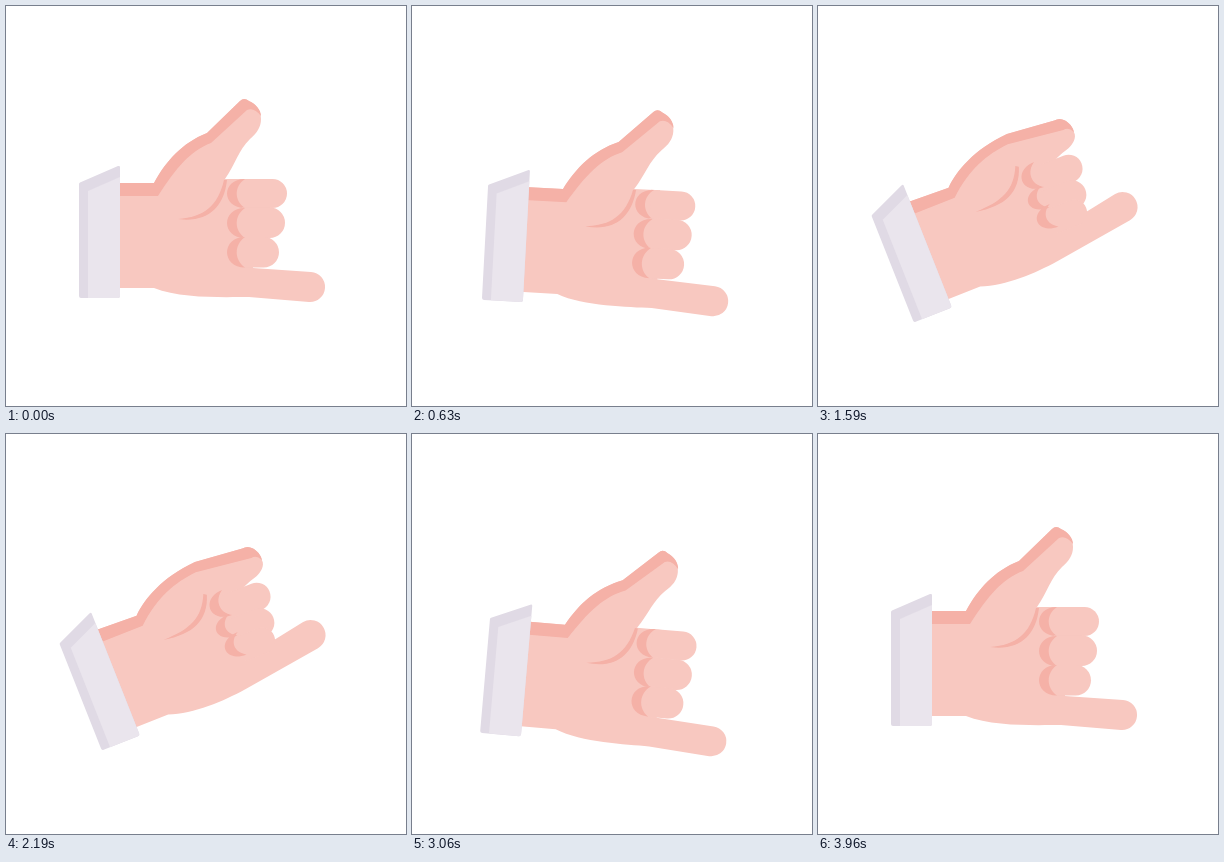
Animation of 400 by 400 pixels, one loop 3990 ms. Source, as an HTML page:

```html
<!DOCTYPE html>
<html lang="en">
<head>
<meta charset="utf-8">
<title>Shaka hand</title>
<style>
  html, body { margin: 0; width: 100%; height: 100%; overflow: hidden; background: #fff; }
  svg { display: block; width: 100%; height: 100%; }
  .skin { fill: #f8c8c0; }
  .shade { fill: #f5b1a7; }
</style>
</head>
<body>
<svg viewBox="0 0 400 400">
  <g id="hand">
    <path id="palm" class="skin"/>
    <path id="edge" class="shade"/>
    <g id="fingers"></g>
    <path id="crease" class="shade"/>
    <path fill="#e0dae5" d="M73 178Q73 177 74 176.500L112 160Q114 159.500 114 161V290Q114 292 112 292H75Q73 292 73 290Z"/>
    <path fill="#eae5ed" d="M82 185L114 171V290Q114 292 112 292H82Z"/>
  </g>
</svg>
<script>
const LOOP = 3990, CYCLE = 600, LAST_FOLD = 3390;
const $ = id => document.getElementById(id);

// Each shape has an open and a folded outline with the same commands.
const shapes = {
  palm: [
    'M110 177 L148 177 C160 155 176 137 201 127 L234 95 Q238 91 243 95 C250 98 255 104 255 113 C255 121 251 127 244 133 C232 145 230 157 219 173 L245 173 L247 262 L305 266 A15 15 0 0 1 303 296 L243 291 C220 291 175 293 148 282 L110 282 Z',
    'M110 178 L155 179.5 C168 167 193 153 229 151 L278 156 Q284 155 288 160 C291 164 293 169 292 174 C293 180 286 185 281 187 C275 189 268 190 262 195 L262 200 L272 253 L307.5 246.7 A15 15 0 0 1 311.7 276.5 L229 288 C205 291 172 292 148 283 L110 283 Z'
  ],
  edge: [
    'M110 177 L148 177 C160 155 176 137 201 127 L234 95 Q238 91 243 95 C250 98 255 104 255 110 Q248 101 241 104 L205 137 C184 145 170 162 152 190 L110 190 Z',
    'M110 178 L155 179.5 C168 167 193 153 229 151 L278 156 Q284 155 288 160 C291 164 293 169 292 174 Q289 167 283 168 L226 161 C202 163 181 170 157 191 L110 191 Z'
  ],
  crease: [
    'M172 213 C198 211 212 200 218 174 L221 174 C218 202 201 217 172 213 Z',
    'M171 212 C200 212 215 206 225 184 L228 186 C220 210 201 218 171 212 Z'
  ]
};

// Finger: top, bottom and right side, then the knuckle shadow's x, top and bottom.
const fingers = [
  [[173, 202, 281, 239, 173, 202], [192, 220, 287.5, 244, 187, 214]],
  [[201.5, 232, 279, 239, 202, 232], [217, 246, 281.5, 241.5, 212, 235]],
  [[231, 261.5, 273, 239, 231, 261.5], [236, 262, 275.5, 243, 232, 256]]
];

const mix = (a, b, k) => a + (b - a) * k;
const mixList = (a, b, k) => a.map((v, i) => mix(v, b[i], k));
const number = /-?\d+(\.\d+)?/g;
function morph([a, b], k) {
  const end = b.match(number);
  let i = 0;
  return a.replace(number, n => +mix(+n, +end[i++], k).toFixed(2));
}

// Sine easing between [time, value] keys.
function keyed(keys, t) {
  const i = keys.findIndex(key => key[0] > t);
  if (i < 0) return keys[keys.length - 1][1];
  const [t0, v0] = keys[i - 1], [t1, v1] = keys[i];
  return mix(v0, v1, (1 - Math.cos(Math.PI * (t - t0) / (t1 - t0))) / 2);
}

const turnKeys = [[0, 0]], foldKeys = [[0, 0]];
for (let t = 390; t <= LAST_FOLD; t += CYCLE) {
  turnKeys.push([t, -21.6]);
  foldKeys.push([t, 1]);
  if (t < LAST_FOLD) {
    turnKeys.push([t + 300, 5.6]);
    foldKeys.push([t + 230, 0]);
  }
}
turnKeys.push([3780, 3.5], [3960, 0]);
foldKeys.push([3660, 0]);

// The hand dips twice per cycle, then lifts once before it settles.
function drop(t) {
  if (t >= 3600) return keyed([[3600, 0], [3690, -18], [3930, 0]], t);
  const depth = t % CYCLE < 300 ? 21 : 30;
  return depth * Math.abs(Math.sin(Math.PI * t / 300)) ** 1.7;
}

const svgNode = cls => {
  const node = document.createElementNS('http://www.w3.org/2000/svg', 'path');
  node.setAttribute('class', cls);
  return $('fingers').appendChild(node);
};
const fingerNodes = fingers.map(() => [svgNode('skin'), svgNode('shade')]);

function draw(t) {
  const fold = keyed(foldKeys, t);
  for (const id in shapes) $(id).setAttribute('d', morph(shapes[id], fold));

  fingers.forEach(([open, folded], i) => {
    const [top, bottom, right, x, y0, y1] = mixList(open, folded, fold);
    const r = (bottom - top) / 2, h = y1 - y0;
    const [body, shadow] = fingerNodes[i];
    body.setAttribute('d', `M${x - 3} ${top}H${right - r}A${r} ${r} 0 0 1 ${right - r} ${bottom}H${x - 3}Z`);
    shadow.setAttribute('d', `M${x} ${y0}C${x - 24} ${y0} ${x - 24} ${y1} ${x} ${y1}C${x - 11} ${y1 - h * .25} ${x - 11} ${y0 + h * .25} ${x} ${y0}Z`);
  });

  $('hand').setAttribute('transform', `translate(0 ${drop(t)}) rotate(${keyed(turnKeys, t)} 93 234)`);
}

const start = performance.now();
function tick() {
  draw((performance.now() - start) % LOOP);
  requestAnimationFrame(tick);
}
tick();
</script>
</body>
</html>
```
